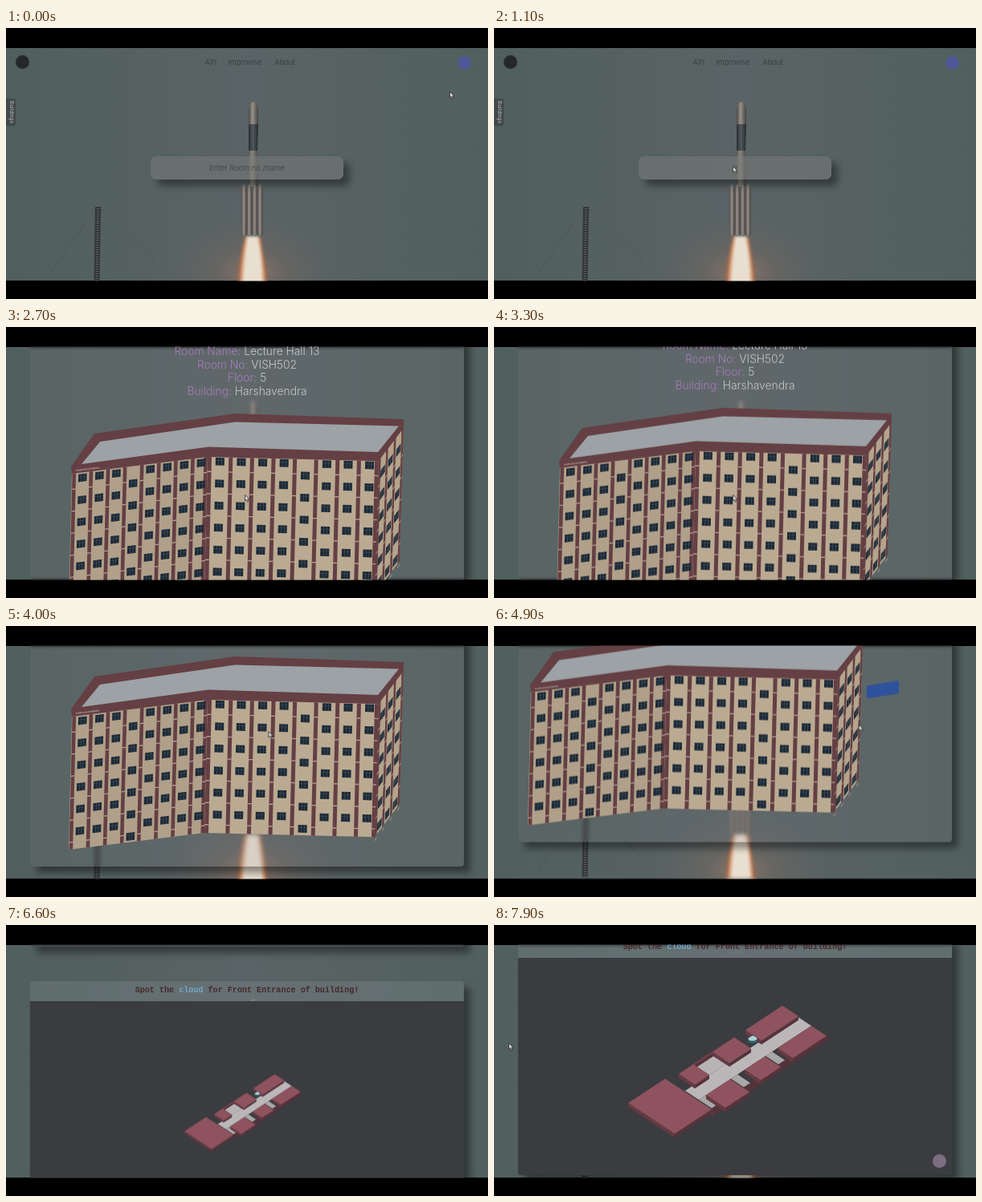
Animation of 600x338 px, one loop 8 s. Source, as an HTML page:

```html
<!DOCTYPE html>
<html lang="en">
<head>
<meta charset="utf-8">
<title>Room finder</title>
<style>
html, body { margin: 0; width: 100%; height: 100%; overflow: hidden; background: #000; }
body { font: 300 9.3px/12px Inter, "Open Sans", sans-serif; color: #303638; }
#stage { position: absolute; left: 0; top: 0; width: 600px; height: 338px; overflow: hidden; background: #000; }
#stage > *, #page > *, .card > * { position: absolute; }
svg { display: block; overflow: visible; }
.bar { left: 0; width: 600px; height: 24px; background: #000; box-shadow: 0 0 0 1px rgba(0, 0, 0, .45); }

/* one clock for every part */
#page, #cursor, #tower, #tag, #plan, #list, .hint, .typed b { animation: 8s linear infinite; }
#tag, #list, .hint, .typed b { animation-timing-function: step-end; }

#page { left: 0; top: 0; width: 600px; animation-name: scroll; }
@keyframes scroll {
  0%, 23.7% { transform: translateY(0); }
  23.75%, 28.75% { transform: translateY(-9px); }
  33.75% { transform: translateY(-320px); }
  41.25% { transform: translateY(-327px); }
  45%, 58.75% { transform: translateY(-390px); }
  66.25%, 70% { transform: translateY(-481px); }
  78.75%, 91.25% { transform: translateY(-663px); }
  98%, 100% { transform: translateY(-717px); }
}

.nav { top: 37px; transform: translateX(-50%); }
.dot { width: 17px; height: 17px; border-radius: 50%; }
.side { left: 0; top: 88px; width: 12px; height: 34px; background: #41494a; color: #c2c4c4; letter-spacing: .25px;
  font: 400 6px/9px Inter, sans-serif; writing-mode: vertical-rl; text-align: center; border-radius: 0 2px 2px 0; }
.search { left: 180px; top: 160px; width: 240px; height: 29px; border-radius: 7px; line-height: 30px; text-align: center;
  background: rgba(128, 130, 130, .42); backdrop-filter: blur(1.6px); box-shadow: 8px 8px 9px rgba(0, 0, 0, .38); }
.search span { position: absolute; inset: 0; }
.hint { animation-name: hint; }
@keyframes hint { 0% { opacity: .85; } 13.75%, 100% { opacity: 0; } }
.typed b { font-weight: 300; animation-name: key; animation-delay: calc(var(--i) * .2s); animation-fill-mode: both; }
@keyframes key { 0% { font-size: 0; } 13.75% { font-size: 9.3px; } 80%, 100% { font-size: 0; } }
#list { left: 180px; top: 193px; width: 192px; border-radius: 3px; overflow: hidden; background: #b9b9b9;
  font-size: 8.8px; font-weight: 400; line-height: 23px; text-align: center; animation-name: list; }
#list div:first-child { background: #4e5c5f; color: #d0d3d3; }
@keyframes list { 0% { visibility: hidden; } 23.75% { visibility: visible; } 28.75%, 100% { visibility: hidden; } }

.card { left: 30px; width: 540px; border-radius: 4px; box-shadow: 8px 8px 9px rgba(0, 0, 0, .4); }
.room { top: 330px; height: 360px; background: rgba(130, 132, 135, .16); backdrop-filter: blur(2px); }
.facts { top: 12px; width: 100%; text-align: center; font-size: 13.8px; line-height: 16.6px; color: #c6c8c9; }
.facts i { font-style: normal; color: #a97cbd; }
.room svg { left: 0; top: 0; }
#tower { animation-name: pan; }
@keyframes pan { 0%, 56.25% { transform: none; } 61.25%, 100% { transform: translateX(-36px); } }
#tag { animation-name: tag; }
@keyframes tag { 0% { opacity: 0; } 56.25%, 100% { opacity: 1; } }

.entry { top: 733px; height: 296px; }
.head { width: 100%; height: 25px; border-radius: 4px 4px 0 0; background: rgba(136, 148, 150, .28); backdrop-filter: blur(2px);
  font: 700 10.1px/24px "Courier New", "Liberation Mono", monospace; text-align: center; color: #46292d; }
.head i { font-style: normal; color: #74a5c6; }
.view { top: 25px; width: 100%; height: 271px; overflow: hidden; background: #3b3c3f; border-radius: 0 0 4px 4px; }
#plan { transform-origin: 300px 176.5px; animation-name: zoom; }
@keyframes zoom {
  0%, 70% { transform: scale(1.37); }
  78.75%, 82.5% { transform: scale(.585); }
  91.25%, 100% { transform: scale(1); }
}
.view .dot { position: absolute; left: 516px; top: 245px; background: #7d6d83; }

#cursor { left: 0; top: 0; animation-name: cursor; }
@keyframes cursor {
  0%, 2% { transform: translate(552px, 79px); }
  11.25%, 22.5% { transform: translate(297px, 172px); }
  24.5%, 41.25% { transform: translate(297px, 209px); }
  50% { transform: translate(326px, 131px); }
  56.25% { transform: translate(480px, 110px); }
  65%, 71% { transform: translate(434px, 132px); opacity: 1; }
  72%, 85% { transform: translate(434px, 132px); opacity: 0; }
  86% { transform: translate(400px, 140px); opacity: 1; }
  90%, 100% { transform: translate(18px, 147px); }
}
</style>
</head>
<body>
<div id="stage">
  <svg width="600" height="338">
    <defs>
      <linearGradient id="sky">
        <stop offset="0" stop-color="#505f5d"/><stop offset=".5" stop-color="#5a6365"/><stop offset="1" stop-color="#51605e"/>
      </linearGradient>
      <linearGradient id="metal">
        <stop offset="0" stop-color="#4a4643"/><stop offset=".4" stop-color="#98928b"/><stop offset="1" stop-color="#45413f"/>
      </linearGradient>
      <linearGradient id="dark">
        <stop offset="0" stop-color="#292e31"/><stop offset=".45" stop-color="#50585b"/><stop offset="1" stop-color="#25292b"/>
      </linearGradient>
      <radialGradient id="glow">
        <stop offset="0" stop-color="#c08a6a" stop-opacity=".5"/><stop offset=".4" stop-color="#96705c" stop-opacity=".22"/>
        <stop offset="1" stop-color="#806a60" stop-opacity="0"/>
      </radialGradient>
      <filter id="soft"><feGaussianBlur stdDeviation="1.5"/></filter>
    </defs>
    <rect y="25" width="600" height="290" fill="url(#sky)"/>
    <g fill="none" stroke="#464d4d" stroke-width=".5">
      <path d="M112 226L54 306M118 226L186 290"/>
      <path stroke="#33383a" stroke-width="7" d="M114.500 223L113 316"/>
      <path stroke="#65625f" stroke-width="3" stroke-dasharray="1 2" d="M114.500 225L113 316"/>
    </g>
    <ellipse cx="306" cy="305" rx="110" ry="70" fill="url(#glow)"/>
    <path d="M302 120V102Q304 93 307.500 92Q312 93 314 102V120Z" fill="url(#metal)"/>
    <path d="M302 120h12l-1 33h-11z" fill="url(#dark)"/>
    <path d="M302 153h11l1 45h-13z" fill="url(#metal)" opacity=".75"/>
    <g id="boosters" fill="url(#metal)"></g>
    <g id="flame" filter="url(#soft)"></g>
  </svg>

  <div id="page">
    <div class="dot" style="left:12px;top:34px;background:#24282b"></div>
    <div class="nav" style="left:255px">API</div>
    <div class="nav" style="left:297.500px">Improvise</div>
    <div class="nav" style="left:347px">About</div>
    <div class="dot" style="left:562px;top:35px;background:#4f5796"></div>
    <div class="side">Buildings</div>
    <div class="search"><span class="hint">Enter Room no./name</span><span class="typed"></span></div>
    <div id="list"><div>VISH502</div><div>VISH503</div><div>VISH505</div><div>VISH507</div><div>VISH509</div></div>

    <div class="card room">
      <div class="facts">
        <i>Room Name:</i> Lecture Hall 13<br><i>Room No:</i> VISH502<br><i>Floor:</i> 5<br><i>Building:</i> Harshavendra
      </div>
      <svg width="540" height="360" viewBox="30 -60 540 360">
        <g id="tower">
          <path id="tag" fill="#2e529b" d="M500 121v-16l40-6.500v16z"/>
          <path fill="#643f43" d="M81 104L110 63L285 38L495 45V56L464 98L251 93L82 114Z"/>
          <path fill="#9ca2a5" d="M94 101L117 73L285 48.500L489 53.500L463 86L252 79.500Z"/>
          <g id="walls"></g>
          <text transform="translate(87 110) rotate(-7)" font-family="Liberation Mono, monospace" font-size="4.100" fill="#d2c9c3">HARSHAVENDRA</text>
        </g>
      </svg>
    </div>

    <div class="card entry">
      <div class="head">Spot the <i>cloud</i> for Front Entrance of building!</div>
      <div class="view">
        <svg width="540" height="271" viewBox="30 41 540 271"><g id="plan"></g></svg>
        <div class="dot"></div>
      </div>
    </div>
  </div>

  <svg id="cursor" width="8" height="11"><path d="M.5.5V8L2.300 6.400L3.600 9.300L4.900 8.700L3.600 5.900H6Z" fill="#d8d8d8" stroke="#222" stroke-width=".7"/></svg>
  <div class="bar" style="top:0"></div>
  <div class="bar" style="top:316px"></div>
</div>

<script>
const FLOORS = 6, STOREY = 27.5, WALL = 166, RED = '#643f43';
const range = n => [...Array(n).keys()];
const fill = (selector, parts) => document.querySelector(selector).innerHTML = parts.join('');
const rect = (x, y, w, h, color) => `<rect x="${x}" y="${y}" width="${w}" height="${h}" fill="${color}"/>`;
const poly = (points, color) => `<polygon points="${points}" fill="${color}"/>`;

fill('.typed', [...'vish'].map((c, i) => `<b style="--i:${i}">${c}</b>`));

// Boosters side by side, and a flame of nested, ever brighter tongues.
fill('#boosters', range(4).map(i => `<path d="M${293 + i * 6.7} 258v-56q3-14 6.700 0v56z"/>`));
fill('#flame', ['#a4694b', '#d9a883', '#e9dfd0'].map((color, i) => {
  const top = 10 - i * 2, foot = 19 - i * 3.5;
  return `<path fill="${color}" d="M${307 - top} 260h${top * 2}q5 26 ${foot - top} 58h${-foot * 2}q2-32 ${foot - top} -58z"/>`;
}));

function pane(x, y, w, h = 9.6) {
  return rect(x - w / 2, y, w, h, '#1b2936') +
    rect(x - w / 6, y, .5, h, '#5a6268') + rect(x + w / 6, y, .5, h, '#5a6268') +
    rect(x - w / 2, y + h / 3, w, .5, '#485259');
}

// A wall is drawn flat with evenly spaced bays, then skewed into place; the stair bay sits half a storey lower.
function wall({ matrix, width, tint, bays, first, pitch, sill, glass, beam, stair }) {
  const pillars = range(bays + 1).map(i => {
    const x = Math.max(0, Math.min(width - beam, first + (i - .5) * pitch - beam / 2));
    return rect(x, 0, beam, WALL, RED) +
      range(FLOORS).map(f => rect(x, sill + 17 + f * STOREY, beam, 1.3, '#b8a391')).join('');
  });
  const panes = range(bays * FLOORS).map(k => {
    const bay = k % bays, drop = bay === stair ? 15 : 0;
    return pane(first + bay * pitch, sill + Math.floor(k / bays) * STOREY + drop, glass);
  });
  return `<g transform="matrix(${matrix})">${rect(0, 0, width, WALL, tint)}${pillars.join('')}${panes.join('')}</g>`;
}

fill('#walls', [
  wall({ matrix: '1 -.125 -.024 1 82 113', width: 169, tint: '#b0a08a', bays: 8, first: 13.4, pitch: 21.1, sill: 1.8, glass: 10.5, beam: 4.6, stair: 3 }),
  wall({ matrix: '1 .025 -.024 1 251 92', width: 213, tint: '#bbaa92', bays: 8, first: 15.5, pitch: 26.6, sill: .6, glass: 11, beam: 5, stair: 4 }),
  wall({ matrix: '1 -1.33 -.03 1 464 97', width: 31, tint: '#b5a48c', bays: 3, first: 5.5, pitch: 9.8, sill: 15.5, glass: 5.5, beam: 2.6 })
]);

// Floor plan on two axes: u runs up and right, v down and right.
const iso = (u, v, drop = 0) => [167 + u + v, 222 + .66 * (v - u) + drop];
const tile = (u, v, du, dv, color) =>
  poly([iso(u, v), iso(u + du, v), iso(u + du, v + dv), iso(u, v + dv)], color);
function block(u, v, du, dv, top = '#8e535e', h = 5) {
  const near = v + dv, far = u + du;
  return poly([iso(u, v), iso(u, near), iso(u, near, h), iso(u, v, h)], '#643a43') +
    poly([iso(u, near), iso(far, near), iso(far, near, h), iso(u, near, h)], '#56333b') +
    tile(u, v, du, dv, top);
}

const BACK = 4, FRONT = 41;
fill('#plan', [
  block(45, 57, 142, 4, '#56333b'),
  tile(47, 24, 140, 17, '#bbb7b9'),
  tile(77, BACK, 24, 20, '#b8b4b6'),
  block(77, BACK - 1, 24, 2, '#643a43'),
  ...[47, 87, 130].map(u => tile(u, FRONT, 8, 16, '#aaa7a8')),
  block(142, BACK, 46, 20),
  block(101, BACK, 27, 21),
  block(59, BACK, 18, 20),
  block(145, FRONT, 42, 19),
  block(104, FRONT, 25, 20),
  block(56, FRONT, 30, 24),
  block(0, 0, 46, 58),
  '<ellipse cx="322" cy="145" rx="6" ry="2.5" fill="#306069"/>',
  '<path d="M316.500 143q0-3.500 3-3.500q2.500-3 5.500 0q3 .5 2 3.500q-5 3-10.500 0z" fill="#a9d0d8"/>'
]);
</script>
</body>
</html>
```
